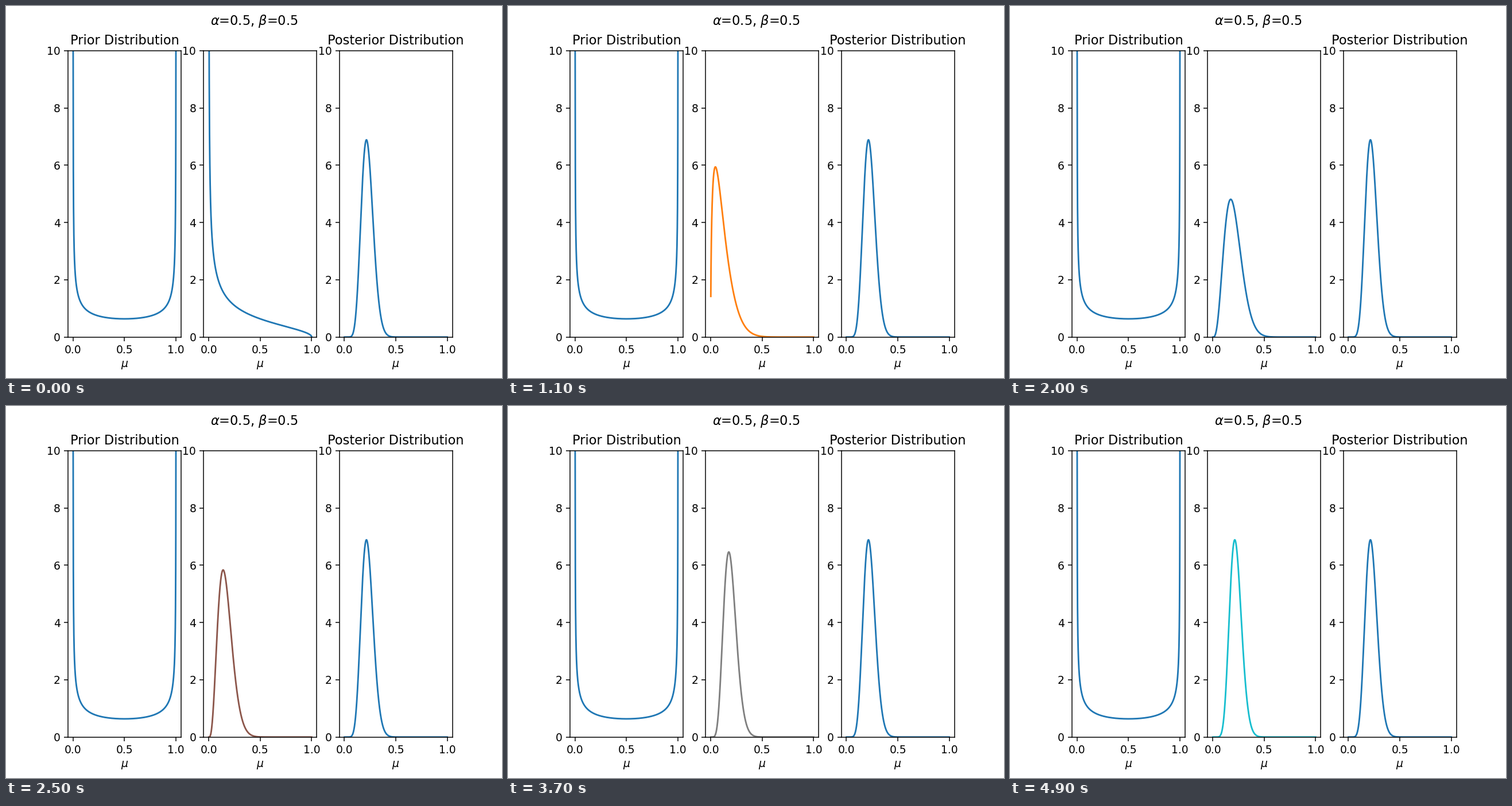
Animation, 864 px wide and 648 px high, one loop 5 s. Source, as a matplotlib script:

```python
import math

import matplotlib.pyplot as plt
import numpy as np
from matplotlib.animation import FuncAnimation

ALPHA, BETA = 0.5, 0.5
TRIALS = 50
SUCCESSES = (3, 12, 14, 20, 30, 31, 37, 38, 40, 42, 48)
MU = np.linspace(0.001, 0.999, 999)


def beta_pdf(a, b):
    log_norm = math.lgamma(a + b) - math.lgamma(a) - math.lgamma(b)
    return np.exp(log_norm + (a - 1) * np.log(MU) + (b - 1) * np.log(1 - MU))


def posterior(trials):
    """Density of mu after the first `trials` coin flips."""
    hits = sum(index < trials for index in SUCCESSES)
    return beta_pdf(ALPHA + hits, BETA + trials - hits)


plt.rcParams["font.family"] = "DejaVu Sans"
fig, axes = plt.subplots(1, 3, figsize=(6.4, 4.8), dpi=135)
fig.suptitle(rf"$\alpha$={ALPHA}, $\beta$={BETA}")

titles = ("Prior Distribution", "", "Posterior Distribution")
curves = (posterior(0), posterior(1), posterior(TRIALS))
lines = []
for ax, title, curve in zip(axes, titles, curves):
    lines += ax.plot(MU, curve, color="C0")
    ax.set_title(title)
    ax.set_xlabel(r"$\mu$")
    ax.set_ylim(0, 10)
running = lines[1]


def update(step):
    running.set_ydata(posterior(step + 1))
    running.set_color(f"C{step % 10}")
    return (running,)


animation = FuncAnimation(
    fig, update, frames=TRIALS, init_func=lambda: update(0),
    interval=100, repeat=True, repeat_delay=0, blit=False,
)
plt.show()
```
